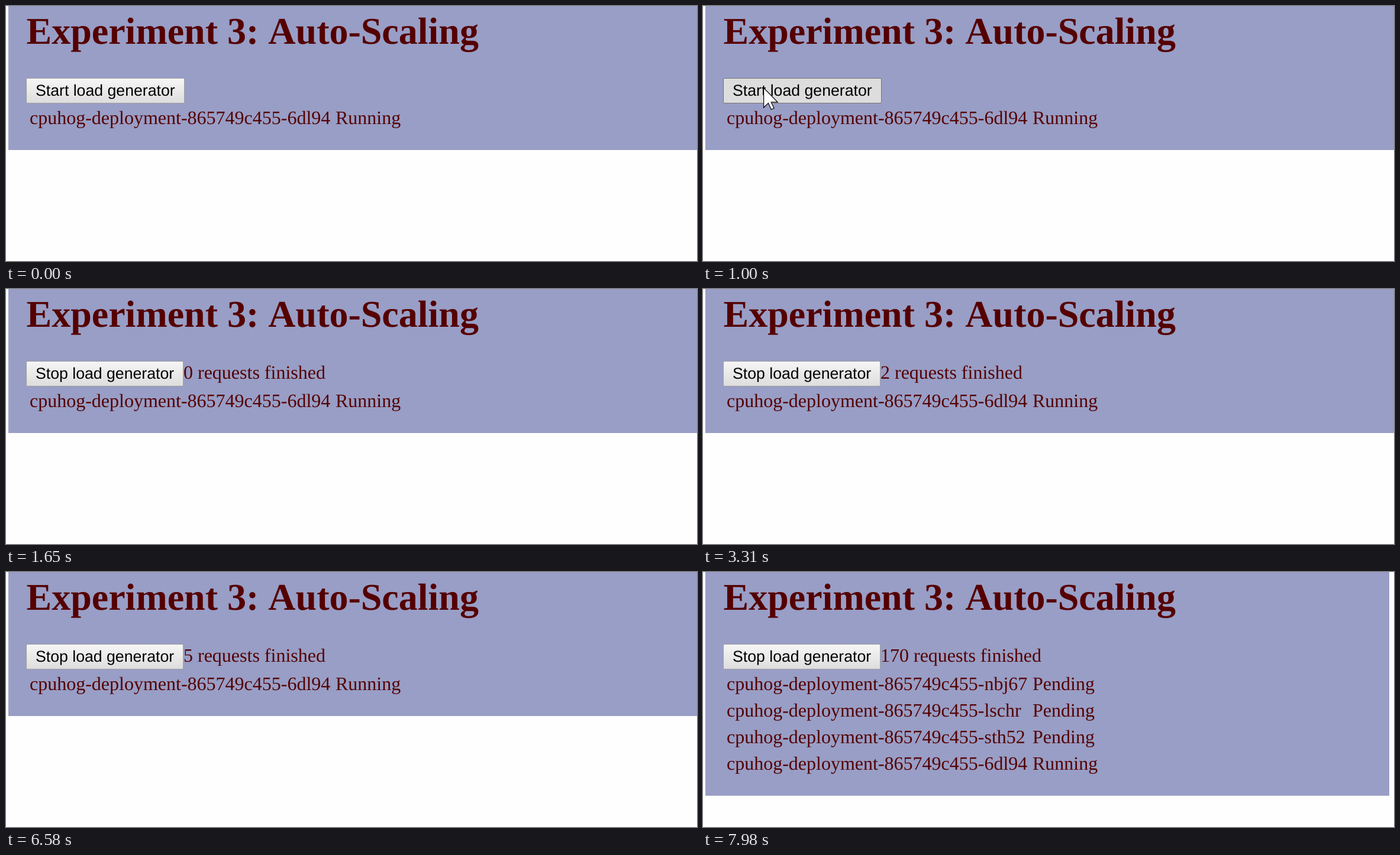
These frames come from a looping animation (1168x432 px, 8000 ms). An HTML page:

```html
<!DOCTYPE html>
<html lang="en">
<head>
<meta charset="utf-8">
<title>Experiment 3: Auto-Scaling</title>
<style>
  html, body { margin: 0; width: 100%; height: 100%; overflow: hidden; background: #fefefe; }
  svg { display: block; }
  text { font: 32px "Liberation Serif", "Times New Roman", serif; font-kerning: none; fill: #500; white-space: pre; text-rendering: geometricPrecision; }
  .title { font-size: 64px; font-weight: bold; }
  .label { font: 26.67px "Liberation Sans", Arial, sans-serif; font-kerning: none; fill: #000; }
  .panel { fill: #989ec6; }
  #button { fill: url(#idle); stroke: #a0a0a0; }
  #button.hover { fill: url(#lit); stroke: #747474; }
  #button.press { fill: #ddd; stroke: #747474; }
  #cursor { fill: #fff; stroke: #000; stroke-width: 1.2; }
</style>
</head>
<body>
<svg width="1168" height="432" viewBox="0 0 1168 432">
  <defs>
    <linearGradient id="idle" x2="0" y2="1">
      <stop stop-color="#f6f6f6"/><stop offset="1" stop-color="#ddd"/>
    </linearGradient>
    <linearGradient id="lit" x2="0" y2="1">
      <stop stop-color="#f9f9f9"/><stop offset="1" stop-color="#e0e0e0"/>
    </linearGradient>
  </defs>
  <rect class="panel" id="panel" x="4" y="0"/>
  <text class="title" x="34.5" y="64">Experiment 3: Auto-Scaling</text>
  <rect id="button" x="34.5" y="122.5" height="42" rx="1.5"/>
  <text class="label" id="label" x="50" y="152"></text>
  <text id="count" x="300" y="152"></text>
  <g id="pods"></g>
  <path id="cursor" d="M.6 .8V34L8.4 26.6L13.3 37.3L18 35.3L13.2 24.9H24.2Z"/>
</svg>
<script>
const LOOP = 8000;
const el = id => document.getElementById(id);
const [panel, button, label, count, pods, cursor] =
  ["panel", "button", "label", "count", "pods", "cursor"].map(el);

const running = [["6dl94", "Running"]];
const scaled = [["nbj67", "Pending"], ["lschr", "Pending"], ["sth52", "Pending"], ...running];

// Each cue changes only the listed parts of the state.
const cues = [
  [0, { look: "", verb: "Start", done: null, at: null, list: running }],
  [460, { look: "hover", at: [75, 144] }],
  [600, { at: [88, 140] }],
  [670, { at: [99, 138] }],
  [810, { at: [102, 138] }],
  [1000, { look: "press" }],
  [1230, { look: "hover", verb: "Stop", done: 0 }],
  [1440, { at: [68, 142] }],
  [1545, { look: "", at: [12, 146] }],
  [1650, { at: null }],
  [2220, { done: 1 }],
  [3310, { done: 2 }],
  [4290, { done: 3 }],
  [5580, { done: 4 }],
  [6580, { done: 5 }],
  [7640, { done: 168, list: scaled }],
  [7980, { done: 170 }]
];

function podRow([id, status], i) {
  const y = 200 + 45 * i;
  return `<text x="40" y="${y}">cpuhog-deployment-865749c455-${id}</text>` +
    `<text x="557" y="${y}">${status}</text>`;
}

function draw(s) {
  const grown = s.list === scaled;
  panel.setAttribute("width", grown ? 1156 : 1164);
  panel.setAttribute("height", grown ? 379 : 244);
  button.setAttribute("class", s.look);
  button.setAttribute("width", s.verb === "Start" ? 267 : 265);
  label.textContent = s.verb + " load generator";
  count.textContent = s.done === null ? "" : s.done + " requests finished";
  pods.innerHTML = s.list.map(podRow).join("");
  cursor.style.display = s.at ? "" : "none";
  if (s.at) cursor.setAttribute("transform", `translate(${s.at})`);
}

let shown = 0;
function tick() {
  const t = performance.now() % LOOP;
  const past = cues.filter(([start]) => start <= t);
  if (past.length !== shown) {
    shown = past.length;
    draw(Object.assign({}, ...past.map(cue => cue[1])));
  }
  requestAnimationFrame(tick);
}
tick();
</script>
</body>
</html>
```
